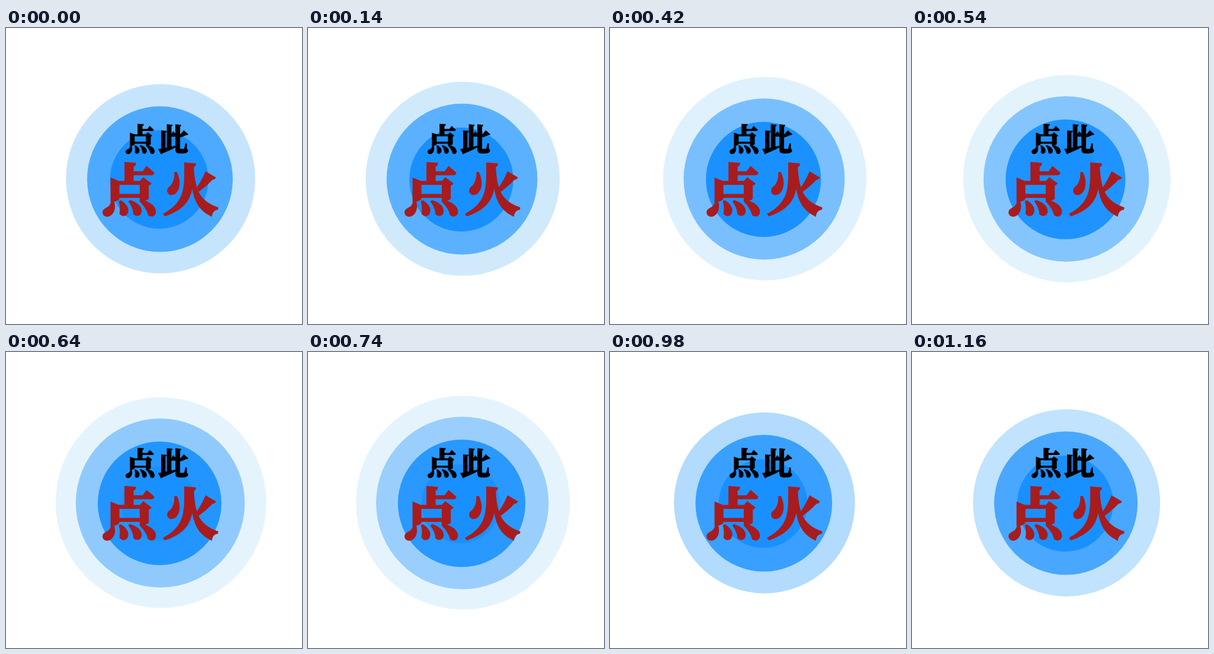
Write an HTML page that moves like this. It is 500 px wide and 500 px high and loops after 1180 ms.

```html
<!DOCTYPE html>
<html lang="zh">
<head>
<meta charset="utf-8">
<style>
  html, body { margin: 0; width: 100%; height: 100%; overflow: hidden; background: #fff; }
  svg { display: block; width: 100vw; height: 100vh; }
  text { font-family: "Noto Serif CJK SC", "Noto Sans CJK SC", "Noto Sans CJK", serif; font-weight: 900; }
</style>
</head>
<body>
<svg viewBox="0 0 500 500">
  <g id="rings"></g>
  <text x="201.3" y="206.6" font-size="51" letter-spacing="5" stroke="#000" stroke-width="2">点此</text>
  <text x="162" y="308.4" font-size="93" letter-spacing="10.5" fill="#a81c1e" stroke="#a81c1e" stroke-width="4">点火</text>
</svg>
<script>
const LOOP = 1180, STEP = 20;
const SPACING = 1220;  // age difference between neighbouring rings, ms
const LIFE = 3350, FADE_START = 250, FADE_END = 3150;
const YOUNG = [25, 144, 255], OLD = [229, 244, 252];

function shade(age) {
  const u = Math.min(1, Math.max(0, (age - FADE_START) / (FADE_END - FADE_START)));
  const k = u * u * (3 - 2 * u);
  return `rgb(${YOUNG.map((c, i) => Math.round(c + (OLD[i] - c) * k))})`;
}

const group = document.getElementById("rings");
const rings = [2, 1, 0, -1].map(order => {
  const node = document.createElementNS("http://www.w3.org/2000/svg", "circle");
  group.append(node);
  return { node, order };
});

function draw(t) {
  for (const { node, order } of rings) {
    const age = t + order * SPACING;
    const r = age > LIFE ? 0 : 83.1 + 0.034 * age - 1.04e-6 * age * age;
    node.setAttribute("r", r);
    node.setAttribute("cx", 256.2 + 0.031 * r);  // the centre drifts as the ring grows
    node.setAttribute("cy", 257.3 - 0.016 * r);
    node.setAttribute("fill", shade(age));
  }
}

const start = performance.now();
function tick() {
  const t = (performance.now() - start) % LOOP;
  draw(Math.floor(t / STEP) * STEP);
  requestAnimationFrame(tick);
}
tick();
</script>
</body>
</html>
```
